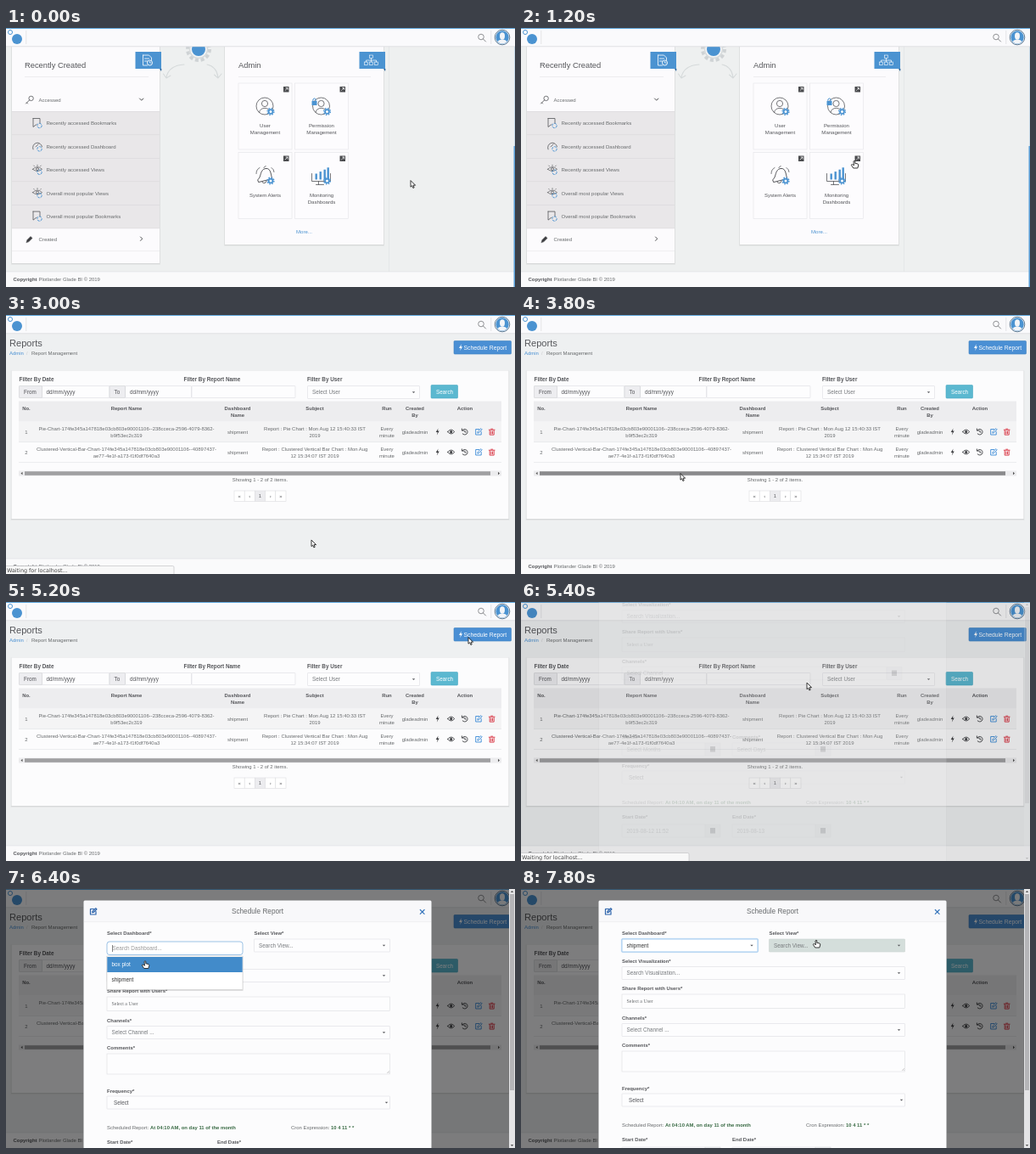
Write an HTML page that moves like this. It is 600 px wide and 305 px high and loops after 8 s.

```html
<!DOCTYPE html>
<html lang="en">
<head>
<meta charset="utf-8">
<title>Schedule a report</title>
<style>
html, body { margin: 0; width: 100%; height: 100%; overflow: hidden; background: #eef0f1; }
svg { display: block; width: 600px; height: 305px; font-family: "Liberation Sans", Arial, sans-serif; }
</style>
</head>
<body>
<svg id="stage" viewBox="0 0 600 305"></svg>
<script>
const LOOP = 8000, STEP = 200;
const BLUE = '#4b93d1', INK = '#55565a', GREY = '#676a6c', LINE = '#dcdde0', DARK = '#3c3d40';
const MENU = 6.06;

// Shape helpers
const rect = (x, y, w, h, fill, stroke = 'none', rx = 0) =>
  `<rect x="${x}" y="${y}" width="${w}" height="${h}" fill="${fill}" stroke="${stroke}" stroke-width=".6" rx="${rx}"/>`;
const path = (d, stroke = INK, w = .8, fill = 'none') =>
  `<path d="${d}" stroke="${stroke}" stroke-width="${w}" fill="${fill}" stroke-linecap="round" stroke-linejoin="round"/>`;
const ring = (x, y, r, stroke = INK, w = .8, fill = 'none', dash = '') =>
  `<circle cx="${x}" cy="${y}" r="${r}" stroke="${stroke}" stroke-width="${w}" fill="${fill}" stroke-dasharray="${dash}"/>`;
const dot = (x, y, r, fill) => ring(x, y, r, 'none', 0, fill);
const at = (x, y, body, opacity = 1, scale = 1) =>
  `<g transform="translate(${x} ${y}) scale(${scale})" opacity="${opacity}">${body}</g>`;
const text = (x, y, s, size = 5.95, fill = GREY, extra = '') =>
  `<text x="${x}" y="${y}" font-size="${size}" fill="${fill}" ${extra}>${s}</text>`;
const bold = (x, y, s, size = 5.95, fill = INK) => text(x, y, s, size, fill, 'font-weight="bold"');
const mid = (x, y, s, size, fill) => text(x, y, s, size, fill, 'text-anchor="middle"');
const boldMid = (x, y, s) => text(x, y, s, 5.9, INK, 'font-weight="bold" text-anchor="middle"');
const caret = (x, y) => path(`M${x - 1.7} ${y - .8}h3.4l-1.7 1.9z`, 'none', 0, INK);
const shadow = (x, y, w, h) =>
  rect(x - 1, y, w + 2, h + 2, 'rgba(0,0,0,.04)') + rect(x - .4, y, w + .8, h + .9, 'rgba(0,0,0,.07)');

// Icons, centred on the origin
const gear = (x, y, r = 3) =>
  ring(x, y, r * .8, BLUE, r * .6, '#fff') + ring(x, y, r * 1.3, BLUE, r * .45, 'none', r * .51);
const person = () => ring(0, 0, 10) + ring(0, -3, 3.6) + path('M-6.5 7.5C-6 .5 6 .5 6.5 7.5') + gear(7, 6.5);
const bell = () => path('M-8 5C-4 3-6-7 1-8S7 1 9 4L-7 8zM-1-9l2-2M-3 8q3 3 5-1', INK, 1) +
  path('M-10-2q0-5 4-7M8-9q3 2 3 5') + gear(7, 6.5);
const bars = () => path('M-11-2v9h22v-9M-3 7v4M-6 11h9') +
  [-7, -2, 3, 7].map((x, i) => rect(x, -2 - i * 2.4, 2.4, 7 + i * 2.4, BLUE)).join('') + gear(7, 6.5);
const locked = () => person() + rect(-11, -6, 6, 5, BLUE) + path('M-9.6-6v-2q1.6-2.4 3.2 0v2', BLUE, 1);
const refresh = () => ring(2.5, 2.5, 2.7, BLUE, 1, 'none', '3 1');
const bookmark = () => path('M-5-6h8v6M-5-6V4l4-3') + refresh();
const dash = () => path('M-5 3A5.5 5.5 0 1 1 5.5 0M-2 0L1-3') + refresh();
const eye = () => path('M-5.5-1Q0-6.5 5.5-1Q0 3.5-5.5-1zM-3.5-4.500l-.8-.8M0-5v-1M3.500-4.500l.8-.8', INK, .7) +
  ring(0, -1.2, 1.5) + refresh();
const key = () => ring(1.6, -1.6, 2.7, INK, .8) + path('M-.4.4L-4.500 4.500M-3.500 3.500l1 1', INK, .9);
const pencil = () => path('M-4 4l1-3 4-4 2 2-4 4z', DARK, .5, DARK);
const bolt = c => path('M.8-4L-2 .6H0L-.8 4 2-1H.2z', 'none', 0, c);
const edit = (c, w = .9) => path('M1-3h-4v6.500h6.500V0M-.8 1.200l.3-1.400L3.300-3.900l1.200 1.200L.7 1z', c, w);
const history = () => path('M-2.700-1.700A3.300 3.300 0 1 1-2.500 2.300M-3.300-3.600v2.200h2.200M.2-1.500V.5h1.300', DARK, .9);
const look = () => path('M-4 0Q0-5 4 0Q0 5-4 0z', DARK, .9) + dot(0, 0, 1.6, DARK);
const bin = () => path('M-2.500-1.700V3.600h5V-1.700M-3.400-2.300h6.800M-1-3.300h2M-.8-.5v2.700M.8-.5v2.700', '#d9303f', .9);

function topBar() {
  return rect(0, 0, 600, 22, '#fafafc') + rect(0, 21.500, 600, .7, '#d4d6d9') + rect(0, 0, 600, 1, '#5fa6dc') +
    dot(13, 13, 6, BLUE) + ring(5, 5, 2.500, BLUE, 1, '#fff') +
    rect(23.500, 3, .7, 16, '#d9dadd') + rect(571.500, 3, .7, 16, '#d9dadd') +
    ring(560, 10.500, 3.300, '#77797c', .8) + path('M562.500 13l3 3', '#77797c', .9) +
    ring(585, 11, 8.800, '#40607c', .8, '#f3f5f8') + dot(585, 11, 7.700, BLUE) +
    '<ellipse cx="585" cy="9.500" rx="3" ry="4.200" fill="#f3f5f8"/>' +
    path('M579.500 16q1.500-2.500 5.500-2.500t5.500 2.500q-5.500 5-11 0z', 'none', 0, '#f3f5f8');
}

function footer() {
  return rect(0, 287, 600, 18, '#fafafb') + rect(0, 286.600, 600, .7, '#dfe1e4') +
    bold(8.500, 298.200, 'Copyright') + text(38.500, 298.200, 'Plotlander Glade BI © 2019');
}

function flag(x, icon) {
  return rect(x, 28, 30.500, 20, BLUE) + path(`M${x + 28.500} 48h2.500l-.5 3z`, 'none', 0, '#2d659b') + at(x + 14, 38, icon);
}

function tile(x, y, icon, ...lines) {
  return rect(x, y, 63, 78, '#fdfcfe', '#e4e4e8') +
    rect(x + 53, y + 4, 6.500, 6.500, '#48494c') + path(`M${x + 55} ${y + 8.500}l3-3h-2m2 0v2`, '#fff', .7) +
    at(x + 31, y + 27, icon) + lines.map((s, i) => mid(x + 31.500, y + 52 + i * 8, s, MENU, INK)).join('');
}

function home() {
  const rows = [[bookmark, 'Recently accessed Bookmarks'], [dash, 'Recently accessed Dashboard'],
    [eye, 'Recently accessed Views'], [eye, 'Overall most popular Views'], [bookmark, 'Overall most popular Bookmarks']];
  const doc = path('M-5-6h7l3 3v3M-5-6V6h5M-3-2h5M-3 1h3', '#fff', .8) + ring(3, 3, 3, '#fff', .9) + path('M3 1.500V3h1.500', '#fff', .7);
  const tree = rect(-2, -6, 4, 3.500, 'none', '#fff') + path('M0-2.500V2M-6 2V0H6v2', '#fff', .7) +
    [-8, -2, 4].map(x => rect(x, 2, 4, 3.500, 'none', '#fff')).join('');
  return rect(0, 0, 600, 305, '#eef0f0') + rect(451, 22, .7, 265, '#e0e3e4') +
    ring(227, 25, 13, '#cfd3d5', 4, 'none', '4 2.800') + ring(227, 25, 10.500, '#d8dbdc', 1.500, '#f3f4f5') + dot(227, 25, 8, BLUE) +
    path('M210 43Q192 44 189 58M185.500 54l3.500 5 5-3M237 43Q248 45 250 58M245.500 55l4.500 4 4-5', '#d6dadb', 1.100) +
    shadow(7, 22, 174, 255) + rect(7, 22, 174, 255, '#fcfbfd') +
    text(22, 47.200, 'Recently Created', 9.350, INK) + rect(22, 57.200, 146, .5, LINE) + flag(152.500, doc) +
    at(28, 84.500, key()) + text(38.500, 87, 'Accessed', MENU) + path('M157.500 83l2.200 2.200 2.200-2.200', DARK, .9) +
    rect(7, 98, 174, 138, '#e9e7e9') +
    rows.map(([icon, s], i) => rect(7, 98 + i * 27.500, 174, .6, '#d9d7da') + at(37, 112.500 + i * 27.400, icon()) +
      text(47.500, 114.300 + i * 27.400, s, MENU)).join('') +
    rect(7, 235.600, 174, .6, '#d9d7da') +
    at(28, 248.500, pencil()) + text(38.500, 251, 'Created', MENU) + path('M158.500 246l2.200 2.200-2.200 2.200', DARK, .9) +
    rect(7, 262.500, 174, .6, '#e5e4e7') +
    shadow(258, 22, 187, 233) + rect(258, 22, 187, 233, '#fcfbfd') +
    text(274, 46.700, 'Admin', 9.350, INK) + rect(274, 57, 156, .5, LINE) + flag(416.500, tree) +
    tile(274, 65, person(), 'User', 'Management') + tile(340.500, 65, locked(), 'Permission', 'Management') +
    tile(274, 146.500, bell(), 'System Alerts') + tile(340.500, 146.500, bars(), 'Monitoring', 'Dashboards') +
    text(342, 242, 'More...', MENU, BLUE) + footer() + topBar() +
    rect(599, 22, 1, 117, '#c9dbe9') + rect(598.500, 139, 1.500, 166, '#5b9fd8');
}

function popup(hover) {
  const marks = [
    path('M-4 4l2-4L4-4 1 2zM-2 0l3 2M-4 1l2-1'), path('M0 4Q-6-1-3-3.500Q-1-4 0-2Q1-4 3-3.500Q6-1 0 4M0-2v3'),
    path('M-4 4l5-5') + ring(2, -2, 2, BLUE), rect(-4, -3.500, 7.500, 7, 'none', INK) + path('M-2 2l5-5M-2 0v2'),
    path('M-3-4h5v3M-3-4v8h3M-1.500-2h2M-1.500 0h2') + dot(2, 2, 1.800, BLUE),
    path('M-4 2A4 4 0 0 1 4 2M0 2l2-2'), ring(-1, 0, 3) + ring(2, 2, 1.600, BLUE),
    path('M-4-3h3v6h-3zM0-3h3v6') + dot(2.500, 2, 1.500, BLUE), path('M-4 2A3 3 0 0 1 1-2Q5-2 4 2z')];
  return rect(359, 242.500, 77, 50.500, 'rgba(0,0,0,.05)', 'none', 2) + rect(360, 242, 75, 49.800, 'rgba(0,0,0,.08)', 'none', 1) +
    rect(361, 241, 73, 49.500, '#fefefe') + (hover ? rect(365, 257.500, 16, 14, '#e1e3e4') : '') +
    marks.map((m, i) => at(373.500 + i % 4 * 16.200, 251 + Math.floor(i / 4) * 13.700, m, .65, .85)).join('');
}

function field(x, y, w, s, { h = 15, arrow = true, fill = '#fdfdfe', edge = '#dddee2', ink = '#777a7d' } = {}) {
  return rect(x, y, w, h, fill, edge, .5) + text(x + 5.500, y + h / 2 + 2.200, s, 6.350, ink) +
    (arrow ? caret(x + w - 7, y + h / 2) : '');
}

function tableRow(no, y, name, subject) {
  const two = (x, lines) => lines.map((s, i) => mid(x, y - 4.200 + i * 8.500, s)).join('');
  return rect(15, y + 9.500, 569, .6, '#e3e4e6') + mid(24, y, no) + two(142, name) + mid(273, y, 'shipment') +
    two(364, subject) + two(449, ['Every', 'minute']) + mid(482, y, 'gladeadmin') +
    [bolt(DARK), look(), history(), edit('#3a8bd6'), bin()].map((m, i) => at(508.700 + i * 16, y - 2.200, m)).join('');
}

function reports(overBar) {
  const plain = { arrow: false, h: 14 };
  const head = (x, ...lines) => lines.map((s, i) => boldMid(x, 111.500 + i * 8.200, s)).join('');
  return rect(0, 0, 600, 305, '#eef0f1') +
    text(4, 37, 'Reports', 11.100, INK) + text(4, 46.800, 'Admin', 5.950, '#4a90d2') +
    text(24, 46.800, '/', 5.500, '#c5c7c9') + text(30, 46.800, 'Report Management') +
    rect(528, 30.500, 67.500, 15.500, '#4a8fd4', '#3f82bf', 1) + at(536, 38.300, bolt('#fff')) +
    text(539.500, 40.600, 'Schedule Report', 6.800, '#fff') +
    shadow(6.500, 65.500, 586, 174.500) + rect(6.500, 65.500, 586, 174.500, '#fcfcfd') +
    bold(15.500, 77.900, 'Filter By Date', 6.370) + bold(209.500, 77.900, 'Filter By Report Name', 6.370) +
    bold(355, 77.900, 'Filter By User', 6.370) +
    field(42, 83.500, 80, 'dd/mm/yyyy', { ...plain, ink: INK }) + field(140.500, 83.500, 78, 'dd/mm/yyyy', { ...plain, ink: INK }) +
    field(15.500, 83.500, 27, 'From', { ...plain, fill: '#ededf0', edge: '#cfd1d4', ink: INK }) +
    field(122, 83.500, 18.500, 'To', { ...plain, fill: '#ededf0', edge: '#cfd1d4', ink: INK }) +
    field(219, 83.500, 122, '', plain) + field(355.500, 83.500, 132, 'Select User') +
    rect(501, 82.500, 31.500, 15.500, '#5bb8d0', '#49a9c3', 1) + text(507, 92.600, 'Search', 6.350, '#fff') +
    rect(15, 101.500, 569, 24, '#ededef') + rect(15, 125.500, 569, 24, '#f4f4f5') +
    head(24, 'No.') + head(142, 'Report Name') + head(273, 'Dashboard', 'Name') + head(364, 'Subject') +
    head(449, 'Run') + head(482, 'Created', 'By') + head(541, 'Action') +
    tableRow('1', 139.700, ['Pie-Chart-174fe345a147818e03cb803e90001106--238cceca-2596-4079-8362-', 'b9f53ec2c319'],
      ['Report : Pie Chart : Mon Aug 12 15:40:33 IST', '2019']) +
    tableRow('2', 163.700, ['Clustered-Vertical-Bar-Chart-174fe345a147818e03cb803e90001106--40897437-', 'ae77-4e1f-a173-f1f0df7640a3'],
      ['Report : Clustered Vertical Bar Chart : Mon Aug', '12 15:34:07 IST 2019']) +
    rect(15, 183.500, 569, 6, '#ececee') + rect(22, 184.200, 549, 4.600, overBar ? '#8a8a8c' : '#a0a0a2') +
    path('M19.500 184.800v3.400l-2-1.700zM580 184.800v3.400l2-1.700z', 'none', 0, '#555') +
    mid(299.500, 196, 'Showing 1 - 2 of 2 items.') +
    ['«', '‹', '1', '›', '»'].map((s, i) => rect(269 + i * 12.200, 207, 12.200, 12.500, i == 2 ? '#ececef' : '#fff', '#dcdde0') +
      mid(275.100 + i * 12.200, 215.300, s, 5.900, INK)).join('') +
    footer() + topBar();
}

function status(opacity = 1) {
  return at(0, 0, rect(-1, 295.500, 199, 12, '#f8f8f8', '#bdbdbf', 1.500) +
    text(1, 302.600, 'Waiting for localhost...', 6.400, '#444', 'font-family="DejaVu Sans, sans-serif"'), opacity);
}

// drop: vertical offset; gap: extra room above Frequency
function modal({ drop = 0, gap = 0, open, chosen, pointer }) {
  const [px, py] = pointer;
  const shade = (x, y, w) => !open && px >= x && px < x + w && py >= y + drop && py <= y + 15 + drop
    ? { fill: '#d4dedb', edge: '#cbd3d1' } : {};
  const pick = (x, y, w, s) => field(x, y, w, s, shade(x, y, w));
  const dated = (x, y, w, s) => field(x, y, w, s, { arrow: false }) +
    rect(x + w, y, 18, 15, '#ededf0', '#d5d6da') + rect(x + w + 6, y + 4, 6, 6.500, '#55565a');
  const glow = rect(118.300, 58.300, 161.400, 16.400, 'none', '#bcd9f3', 1.500);
  const board = open ? '' : chosen
    ? glow + field(119, 59, 160, 'shipment', { edge: '#66a9e4', ink: '#333', fill: '#fff' })
    : pick(119, 59, 160, 'Search Dashboard...');
  const second = py >= 97.500;
  const list = !open ? '' : rect(119, 62, 160, 15.500, '#fff', '#5b9bd5', 3) +
    text(125.500, 72, 'Search Dashboard...', 6.350, '#999') + rect(125, 66, .6, 8, '#333') +
    rect(118.500, 79, 161, 41, 'rgba(0,0,0,.12)') + rect(119, 79, 160, 39.500, '#fff', '#ccc') +
    rect(119.300, second ? 98 : 80, 159.400, 18, '#428bca') +
    text(124.500, 91.200, 'box plot', 6.350, second ? '#333' : '#fff') + text(124.500, 109.200, 'shipment', 6.350, second ? '#fff' : '#333');
  const upper = bold(119, 87.200, 'Select Visualization*') + pick(119, 91.500, 333.500, 'Search Visualization...') +
    bold(119, 119.200, 'Share Report with Users*') + rect(119, 124, 333.500, 16.500, '#fdfdfe', '#dddee2') +
    text(124.500, 134.200, 'Select a User', 5.900, GREY, 'font-family="Liberation Serif, serif"') +
    bold(119, 154, 'Channels*');
  const middle = gap
    ? dated(119, 158.500, 312, 'Select Channel ...') + bold(119, 243, 'Month*') + bold(249, 243, 'Comments*') +
      dated(119, 248, 98, 'Select Months') + dated(249, 248, 98, 'Select Days')
    : pick(119, 158.500, 333.500, 'Select Channel ...') +
      bold(119, 186.200, 'Comments*') + rect(119, 191, 333.500, 24, '#fdfdfe', '#dddee2') +
      path('M449.500 213.500l2-2M451 213.700l.7-.7', '#999', .5);
  const lower = bold(119, 236.600, 'Frequency*') + field(119, 241, 333.500, '', { arrow: false }) +
    text(127, 250.700, 'Select', 6.350, INK) + caret(448.500, 248.500) +
    text(119, 279.700, 'Scheduled Report:') + bold(170, 279.700, 'At 04:10 AM, on day 11 of the month', 5.900, '#3a6b45') +
    text(336, 279.700, 'Cron Expression:') + bold(383, 279.700, '10 4 11 * *', 5.900, '#3a6b45') +
    bold(119, 296.700, 'Start Date*') + bold(249, 296.700, 'End Date*') +
    dated(119, 304, 98, '2019-08-12 11:52') + dated(249, 304, 98, '2019-08-13');
  return at(0, drop, rect(91.500, 13.500, 410, 400, '#fcfcfd', '#b9babd', 2) + rect(92, 14, 409, 24.500, '#f8f8fa') + rect(92, 38.500, 409, .6, '#e7e8eb') +
    at(102.500, 26.500, edit('#2d64ab', 1.200)) + mid(296.500, 29.300, 'Schedule Report', 8.200, GREY) +
    path('M488.300 24.500l4.800 4.800m0-4.800l-4.800 4.800', '#3a78bd', 1.200) +
    bold(119, 54.300, 'Select Dashboard*') + bold(292.500, 54.300, 'Select View*') + board + pick(292.500, 59, 160, 'Search View...') +
    at(0, open ? 3 : 0, upper + middle + at(0, gap, lower)) + list);
}

function pageScroll(opacity = 1) {
  return at(0, 0, rect(593, 0, 7, 305, '#e4e4e6') + rect(594, 6, 5, 231, '#b4b4b7') +
    path('M594.800 4h3.400l-1.700-2zM594.800 301h3.400l-1.700 2z', 'none', 0, '#555'), opacity);
}

// time, x, y, hand
const track = [
  [0, 477, 180, 0], [200, 474, 178, 0], [1200, 393, 156, 1], [1600, 348, 236, 1], [2000, 350, 237, 1], [2200, 365, 260, 1],
  [2400, 375, 273, 1], [2800, 375, 273, 0], [3400, 330, 250, 0], [3800, 188, 187, 0], [4200, 188, 187, 0],
  [4600, 330, 130, 0], [5000, 556, 39, 1], [5200, 545, 42, 0], [5400, 337, 95.500, 0], [5600, 224, 101, 1],
  [6000, 200, 68, 1], [6200, 192, 69, 1], [6400, 164, 84.500, 1], [6800, 150, 106, 1], [7000, 152, 106, 1], [7800, 348, 60, 1]];

function pointerAt(t) {
  const i = track.findLastIndex(k => k[0] <= t), a = track[i], b = track[i + 1] || a;
  const p = b === a ? 0 : (t - a[0]) / (b[0] - a[0]);
  return [a[1] + (b[1] - a[1]) * p, a[2] + (b[2] - a[2]) * p, a[3]];
}

function cursor([x, y, hand]) {
  return at(x, y, hand
    ? path('M-.8.700Q0-.3.800.700V3.300L4 4Q5 4.500 4.700 6L3.800 9H-1.300L-3.600 5.500Q-3.500 4.200-2.200 4.700L-.8 5.500z', '#222', .9, '#fff')
    : path('M0 0v7.200l1.700-1.500 1.200 2.800 1.300-.6-1.200-2.700h2.200z', '#222', .9, '#fff'));
}

function scene(t) {
  const pointer = pointerAt(t);
  let out = t < 2800 ? home() : reports(t >= 3600 && t < 4400);
  if (t >= 2000 && t < 2800) out += popup(t >= 2400);
  if (t >= 2600 && t < 3600) out += status();
  if (t === 5400) {
    out += rect(0, 0, 600, 305, 'rgba(0,0,0,.1)') + at(0, 0, modal({ drop: -82, gap: 40, pointer }), .17) +
      pageScroll(.25) + status();
  } else if (t > 5400) {
    const open = t >= 6200 && t < 7000;
    out += rect(0, 0, 600, 305, 'rgba(0,0,0,.5)') +
      modal({ drop: t === 5600 ? -2 : 0, open, chosen: t >= 7000, pointer }) + pageScroll();
    if (t === 5600) out += status(.3);
  }
  return out + cursor(pointer);
}

const stage = document.getElementById('stage'), start = performance.now();
let shown = -1;
function draw() {
  const t = Math.floor((performance.now() - start) % LOOP / STEP) * STEP;
  if (t !== shown) stage.innerHTML = scene(shown = t);
  requestAnimationFrame(draw);
}
draw();
</script>
</body>
</html>
```
